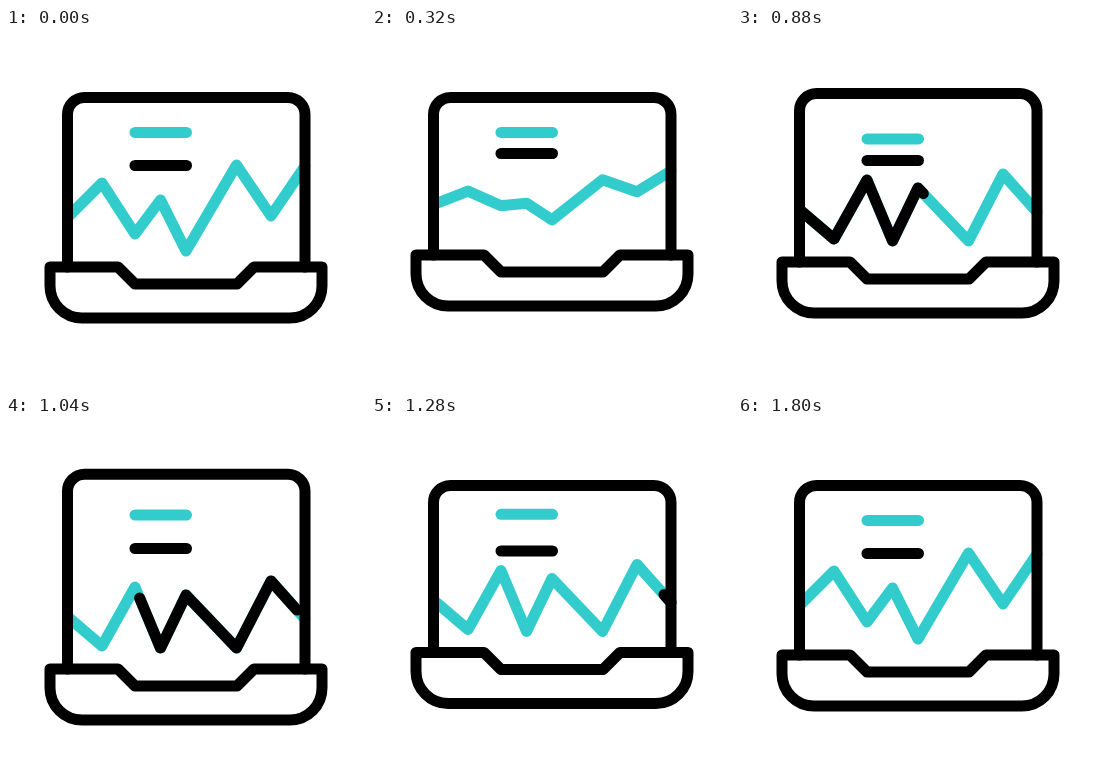
An HTML page that plays this animation: 360 px wide and 360 px high, repeating every 2 s.

```html
<!DOCTYPE html>
<html lang="en">
<head>
<meta charset="utf-8">
<title>Laptop chart</title>
<style>
  html, body { margin: 0; width: 100%; height: 100%; overflow: hidden; background: #fff; }
  svg { display: block; width: 100vw; height: 100vh; }
  path { fill: none; stroke: #000; stroke-width: 11; stroke-linecap: round; stroke-linejoin: round; }
  .teal { stroke: #33cccc; }
</style>
</head>
<body>
<svg viewBox="0 0 360 360">
  <path id="barTop" class="teal" d="M129 104.400H180.500"/>
  <path id="barLow" d="M129 137.500H180.500"/>
  <path id="chart" class="teal"/>
  <path id="trace" pathLength="1"/>
  <path id="lid"/>
  <path id="base" d="M112 239H44V258A32 32 0 0 0 76 290H284A32 32 0 0 0 316 258V239H248L231 256H129Z"/>
</svg>
<script>
const LOOP = 2000, STEP = 40;
const [barTop, barLow, chart, trace, lid, base] =
  ['barTop', 'barLow', 'chart', 'trace', 'lid', 'base'].map(id => document.getElementById(id));

// Chart corners: x, then y before and after the morph
const corners = [
  [62, 189, 187], [96, 155, 216], [129, 206, 157], [154.5, 172, 218],
  [180, 223, 165], [230.5, 137, 218], [265, 188, 151], [299, 138, 189]
];

const part = (t, from, to) => Math.min(1, Math.max(0, (t - from) / (to - from)));
const lerp = (a, b, k) => a + (b - a) * k;

// Smooth 0 to 1
function ease(t, from, to) {
  const x = part(t, from, to);
  return x * x * (3 - 2 * x);
}

// Smooth 0 to 1 and back to 0
const pulse = (t, from, to) => Math.sin(Math.PI * part(t, from, to)) ** 2;

const shift = (el, y) => el.setAttribute('transform', `translate(0 ${y})`);

function draw(t) {
  // The laptop squashes, stretches, then settles
  const squash = -12 * ease(t, 120, 320);
  const settle = 5 * ease(t, 1160, 1400);
  const dy = squash + 7 * ease(t, 640, 880) + 20 * pulse(t, 880, 1160) + settle;
  const top = 69.5 - 14 * pulse(t, 820, 1160) + 4 * pulse(t, 1040, 1280);

  shift(base, dy);
  shift(barLow, squash + 7 * ease(t, 320, 640) + settle);
  shift(barTop, 10 * (ease(t, 320, 640) - 2 * ease(t, 780, 1160) + ease(t, 1160, 1440)));
  lid.setAttribute('d',
    `M61.500 ${239 + dy}V${top + 17}a17 17 0 0 1 17 -17H282a17 17 0 0 1 17 17V${239 + dy}`);

  const mix = ease(t, 120, 640) - ease(t, 1320, 1800);
  const d = 'M' + corners.map(([x, a, b]) => `${x} ${lerp(a, b, mix) + dy}`).join('L');
  chart.setAttribute('d', d);
  trace.setAttribute('d', d);

  // A black section runs along the chart
  const head = ease(t, 640, 1084), tail = ease(t, 888, 1320);
  trace.style.display = head > tail ? '' : 'none';
  trace.style.strokeDasharray = `${head - tail} 2`;
  trace.style.strokeDashoffset = -tail;
}

function tick() {
  const t = performance.now() % LOOP;
  draw(Math.floor(t / STEP) * STEP);
  requestAnimationFrame(tick);
}
tick();
</script>
</body>
</html>
```
